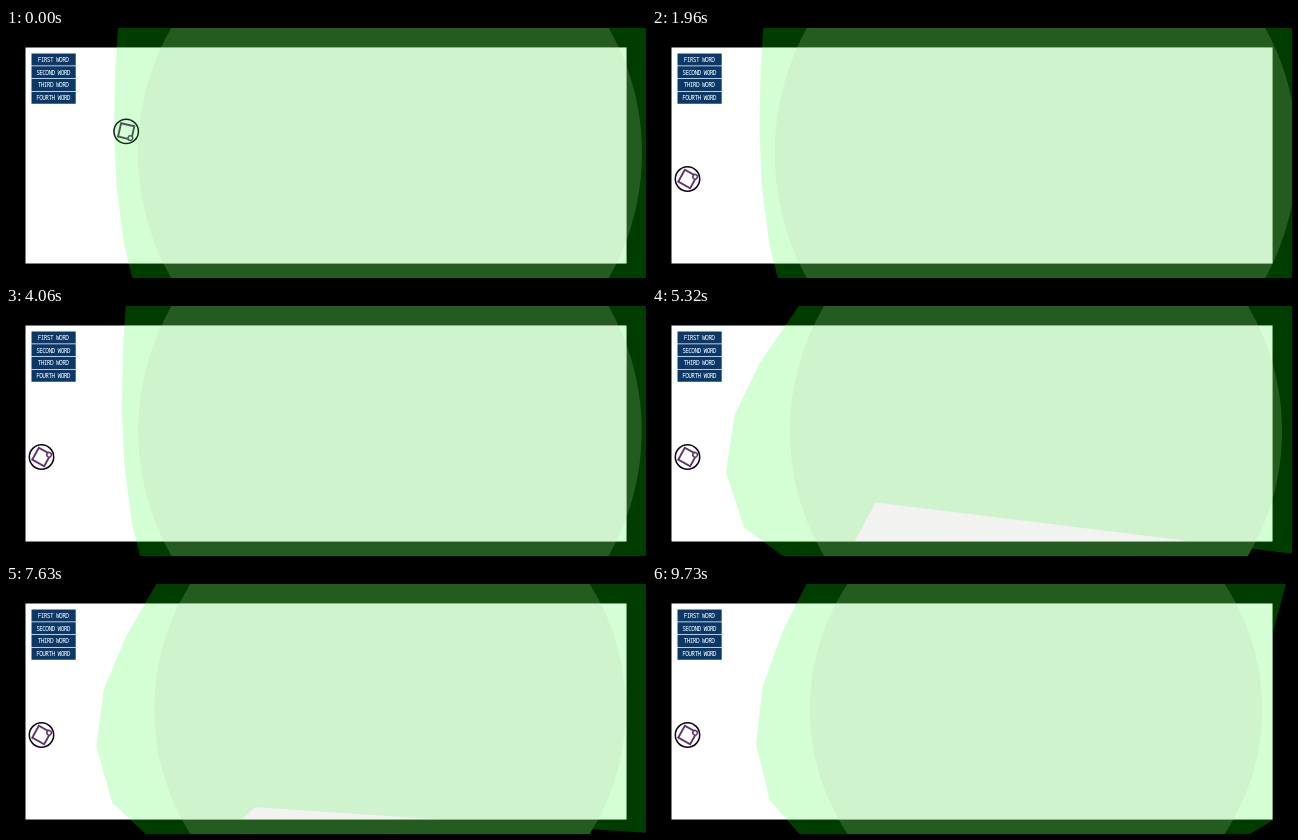
Animation, 640 px wide and 250 px high, one loop 9.8 s. Source, as an HTML page:

```html
<!DOCTYPE html>
<html lang="en">
<head>
<meta charset="utf-8">
<title>Word menu</title>
<style>
  html, body { margin: 0; width: 100%; height: 100%; overflow: hidden; background: #000; }
  svg { display: block; width: 640px; height: 250px; }
  text {
    font: 500 6.2px "Noto Sans Mono", "DejaVu Sans Mono", monospace;
    letter-spacing: -.65px; fill: #fff; text-anchor: middle;
  }
</style>
</head>
<body>
<svg viewBox="0 0 640 250">
  <defs>
    <path id="blob"/>
    <circle id="disc" cx="384" cy="125"/>
    <clipPath id="page"><rect x="19.5" y="19.5" width="601" height="216"/></clipPath>
  </defs>
  <rect width="640" height="250"/>
  <use href="#blob" fill="#003c00"/>
  <use href="#disc" fill="#245c20"/>
  <rect x="19.5" y="19.5" width="601" height="216" fill="#fff"/>
  <g id="icon" fill="none">
    <circle r="12.2" stroke="#0a0410" stroke-width="1.5"/>
    <g id="spin" stroke="#5c346a" stroke-width="1.9">
      <rect x="-6.8" y="-6.8" width="13.6" height="13.6"/>
      <circle cx="5.6" cy="5.6" r="2.3" fill="#fff" stroke-width="1.5"/>
    </g>
  </g>
  <g clip-path="url(#page)">
    <use href="#blob" fill="#0f0" fill-opacity=".17"/>
    <use href="#disc" fill="#a8b0a0" fill-opacity=".15"/>
  </g>
  <g id="menu"></g>
</svg>
<script>
const LOOP = 9800, STEP = 70;
const el = id => document.getElementById(id);
const mix = (a, b, f) => a + (b - a) * f;
const ramp = (t, from, to) => Math.min(1, Math.max(0, (t - from) / (to - from)));
const smooth = f => f * f * (3 - 2 * f);

// Leftmost corner of the blob and how strongly its rim bends there
function blobTip(t) {
  const swell = 105 * Math.sin(Math.PI * ramp(t, 140, 1050));
  const drift = t > 140 ? 99.5 + .004 * t : 108;
  const shrink = smooth(ramp(t, 5300, 9700));
  const morph = ramp(t, 4130, 4480);
  return {
    x: mix(drift - swell, 74 + 30 * shrink, morph),
    y: mix(101, 166 - 6 * shrink, morph),
    bend: mix(.14, 1 - .23 * shrink, morph)
  };
}

// Walk along the rim from the tip in equal sides, each turned a little further
function walk({ x, y, bend }, dir) {
  const points = [];
  for (let i = 0; i < 4; i++) {
    const n = dir < 0 ? i : -1 - i;
    const turn = bend * (8.5 + 22 * n - 4.5 * n * n) * Math.PI / 180;
    x -= dir * 58 * Math.sin(turn);
    y += dir * 58 * Math.cos(turn);
    points.push([x, y]);
  }
  return points;
}

function draw(t) {
  const tip = blobTip(t);
  const out = 60 * (1 - ramp(t, 8820, 9030));
  const right = [[598, 250], [621, 236], [621, 48], [634, 0]].map(([x, y]) => [x + out, y]);
  const rim = [...walk(tip, -1).reverse(), [tip.x, tip.y], ...walk(tip, 1), ...right];
  el("blob").setAttribute("d", "M" + rim.join("L") + "Z");
  el("disc").setAttribute("r", mix(252, 270 - .0045 * t, ramp(t, 140, 490)));

  const roll = ramp(t, 140, 1050);
  el("icon").setAttribute("transform", `translate(${mix(120.2, 35.5, roll)} ${mix(103.4, 151, roll)})`);
  el("spin").setAttribute("transform", `rotate(${mix(13, -61, roll)})`);
}

el("menu").innerHTML = ["FIRST", "SECOND", "THIRD", "FOURTH"].map((word, i) => {
  const y = 25.5 + i * 12.75;
  return `<rect x="25.5" y="${y}" width="44.2" height="12" fill="#0a3868"/>
    <text x="47" y="${y + 8.3}">${word} WORD</text>`;
}).join("");

function frame() {
  const t = performance.now() % LOOP;
  draw(Math.floor(t / STEP) * STEP);
  requestAnimationFrame(frame);
}
frame();
</script>
</body>
</html>
```
